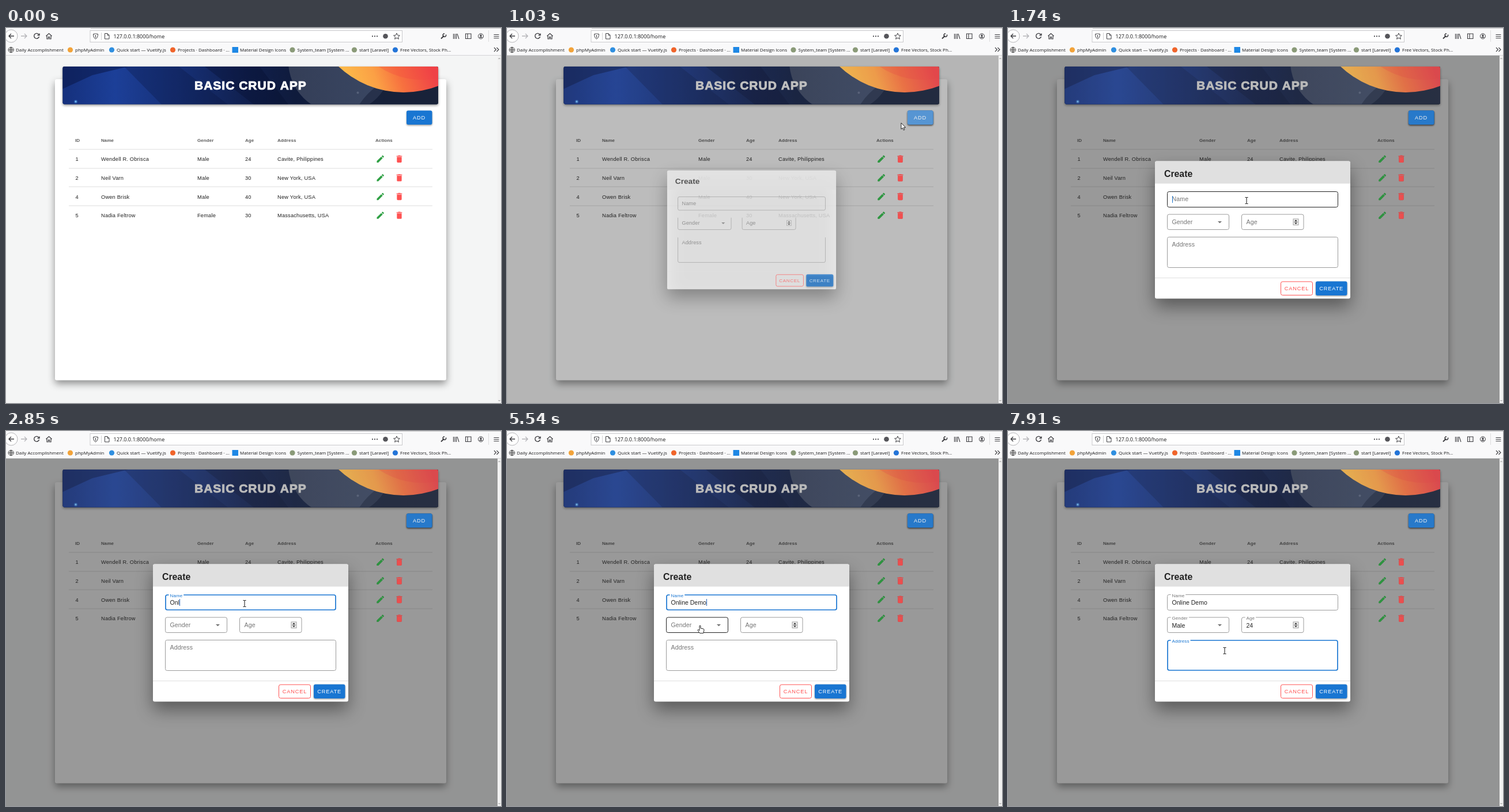
An HTML page with a canvas that plays this animation: 859 by 652 pixels, repeating every 8 s.

```html
<!DOCTYPE html>
<html lang="en">
<head>
<meta charset="utf-8">
<title>Basic CRUD App</title>
<style>
  html, body { margin: 0; width: 100%; height: 100%; overflow: hidden; background: #f4f5f5; }
  canvas { display: block; width: 859px; height: 652px; }
</style>
</head>
<body>
<canvas id="stage" width="859" height="652"></canvas>
<script>
const ctx = document.getElementById('stage').getContext('2d');
const LOOP = 8000, STEP = 79;
const SANS = '"Liberation Sans", Arial, sans-serif';
const UI = '"Open Sans", "Noto Sans", sans-serif';
const BLUE = '#1976d2', RED = '#ff5252', INK = '#212121', GREY = '#757575';

const clamp = v => Math.max(0, Math.min(1, v));
const ramp = (t, a, b) => clamp((t - a) / (b - a));
const easeOut = (v, n) => 1 - Math.pow(1 - v, n);
const mix = (a, b, k) => a + (b - a) * k;

function text(s, x, y, size, color, { weight = 400, font = SANS, gap = 0 } = {}) {
  ctx.font = `${weight} ${size}px ${font}`;
  ctx.letterSpacing = gap + 'px';
  ctx.fillStyle = color;
  ctx.fillText(s, x, y);
  return ctx.measureText(s).width;
}
function rect(x, y, w, h, color) {
  ctx.fillStyle = color;
  ctx.fillRect(x, y, w, h);
}
function roundPath(x, y, w, h, r) {
  ctx.beginPath();
  ctx.roundRect(x, y, w, h, r);
}
function panel(x, y, w, h, color, blur = 0, drop = 0, shade = 0) {
  ctx.save();
  ctx.shadowColor = `rgba(0,0,0,${shade})`;
  ctx.shadowBlur = blur;
  ctx.shadowOffsetY = drop;
  roundPath(x, y, w, h, 3);
  ctx.fillStyle = color;
  ctx.fill();
  ctx.restore();
}
function disc(x, y, r, color) {
  ctx.beginPath();
  ctx.arc(x, y, r, 0, 7);
  ctx.fillStyle = color;
  ctx.fill();
}
function poly(points, color) {
  ctx.beginPath();
  points.forEach(p => ctx.lineTo(...p));
  ctx.fillStyle = color;
  ctx.fill();
}
function stroke(d, color, width = 1.2) {
  ctx.strokeStyle = color;
  ctx.lineWidth = width;
  ctx.stroke(new Path2D(d));
}
function icon(path, cx, cy, scale, color) {
  ctx.save();
  ctx.translate(cx - 12 * scale, cy - 12 * scale);
  ctx.scale(scale, scale);
  ctx.fillStyle = color;
  ctx.fill(path);
  ctx.restore();
}

const PENCIL = new Path2D('M20.7 7C21.1 6.6 21.1 6 20.7 5.6L18.4 3.3C18 2.9 17.4 2.9 17 3.3L15.1 5.1L18.9 8.9ZM3 17.3V21H6.8L17.8 9.9L14.1 6.2Z');
const TRASH = new Path2D('M19 4H15.5L14.5 3H9.5L8.5 4H5V6H19ZM6 19A2 2 0 0 0 8 21H16A2 2 0 0 0 18 19V7H6Z');

// Browser chrome

const BOOKMARKS = [
  [17, 'Daily Accomplishment'],
  [120, 'phpMyAdmin', '#f2a33a'],
  [192, 'Quick start — Vuetify.js', '#2f8fe0'],
  [298, 'Projects · Dashboard · ...', '#f0642b'],
  [406, 'Material Design Icons', '#1e88e5', true],
  [505.5, 'System_team [System ...', '#8a9a78'],
  [613, 'start [Laravel]', '#8a9a78'],
  [684, 'Free Vectors, Stock Ph...', '#2374d8']
];

function drawChrome() {
  const dark = '#3c3c40';
  rect(0, 0, 859, 47, '#f9f9fa');
  rect(147, 0, 712, 1, '#c8c8ca');
  rect(0, 47, 859, 1, '#d4d4d6');

  disc(9, 14, 11, '#fff');
  stroke('M-2 14a11 11 0 1 0 22 0a11 11 0 1 0 -22 0', '#b5b5b8', 1);
  stroke('M14 14H5M9 10L5 14L9 18', dark, 1.4);
  stroke('M26 14H36M32 10L36 14L32 18', '#b4b4b8', 1.3);
  stroke('M57 11.5A4.5 4.5 0 1 0 57.5 15M58 9.5V12.5H54.5', dark, 1.4);
  stroke('M69.5 14L74.5 9.5L79.5 14M71 13.5V19H73.5V15.5H75.5V19H78V13.5', dark);

  rect(145.5, 4, 542.5, 21, '#c9c9cc');
  rect(146.5, 5, 540.5, 19, '#fff');
  stroke('M151.5 10.5Q155 10.5 155.5 9.5Q156 10.5 159.5 10.5Q159.5 17 155.5 19Q151.5 17 151.5 10.5ZM155.5 12V17', dark, 1);
  rect(165, 8, 1, 13, '#d0d0d3');
  stroke('M171.5 9.5H176L179 12.5V19H171.5ZM176 9.5V12.5H179', dark, 1);
  text('127.0.0.1:8000/home', 186.5, 17.8, 9, '#18181a', { font: UI });

  for (const x of [636, 640, 644]) disc(x, 14.3, 1.1, dark);
  disc(658.5, 14.3, 4.3, '#55555a');
  stroke('M678 9L679.6 12.6L683.4 13L680.5 15.5L681.4 19.3L678 17.3L674.6 19.3L675.5 15.5L672.6 13L676.4 12.6Z', dark, 1);
  stroke('M755 18.5L760 13.5', dark, 2);
  stroke('M763.5 11.5A2.8 2.8 0 1 1 761 9.7', dark, 1.5);
  stroke('M776.5 10V19M779 10V19M781.5 10V19M783 10L786 19', dark, 1.1);
  stroke('M797.5 10H807V18.5H797.5ZM801 10V18.5', dark, 1.1);
  stroke('M819.5 14.3a4.5 4.5 0 1 0 9 0a4.5 4.5 0 1 0 -9 0', dark, 1);
  disc(824, 13, 1.7, dark);
  poly([[821, 17], [822.5, 15.3], [825.5, 15.3], [827, 17]], dark);
  rect(837, 4, 1, 20, '#dcdcde');
  stroke('M846.5 11.5H855.5M846.5 14.5H855.5M846.5 17.5H855.5', dark, 1);
  stroke('M847 34L850.5 37.5L847 41M851.5 34L855 37.5L851.5 41', dark, 1.1);

  stroke('M4 38a4.7 4.7 0 1 0 9.4 0a4.7 4.7 0 1 0 -9.4 0M4 38H13.4M8.7 33.3V42.7M8.7 33.3Q4.5 38 8.7 42.7Q13 38 8.7 33.3', '#444', 0.9);
  for (const [x, label, color, square] of BOOKMARKS) {
    if (square) rect(x - 13.5, 33, 10.5, 10, color);
    else if (color) disc(x - 8.5, 38, 4.6, color);
    text(label, x, 40.8, 8, '#18181a', { font: UI });
  }
  rect(853, 48, 6, 604, '#f1f1f1');
  stroke('M854.5 54L856 52.5L857.5 54M854.5 647L856 648.5L857.5 647', '#777', 0.9);
}

// Page

const COLUMNS = [[120, 'ID'], [165, 'Name'], [332, 'Gender'], [415, 'Age'], [471, 'Address'], [641, 'Actions']];
const PEOPLE = [
  ['1', 'Wendell R. Obrisca', 'Male', '24', 'Cavite, Philippines'],
  ['2', 'Neil Varn', 'Male', '30', 'New York, USA'],
  ['4', 'Owen Brisk', 'Male', '40', 'New York, USA'],
  ['5', 'Nadia Feltrow', 'Female', '30', 'Massachusetts, USA']
];
const rowTop = i => 211 + i * 32.65;

function drawBanner(titleColor) {
  ctx.save();
  roundPath(98.5, 67, 651.5, 65.5, 3);
  ctx.clip();
  let g = ctx.createLinearGradient(98, 0, 750, 0);
  [[0, '#15307c'], [0.14, '#1c3f98'], [0.32, '#162f74'], [0.5, '#101f4c'], [0.62, '#0f1b3c'], [1, '#1a2439']]
    .forEach(([at, c]) => g.addColorStop(at, c));
  rect(98, 67, 653, 66, g);
  poly([[98, 67], [212, 67], [150, 82], [98, 106]], 'rgba(8,20,66,.5)');
  poly([[205, 67], [300, 67], [385, 133], [270, 133]], 'rgba(8,18,60,.28)');
  poly([[345, 67], [440, 67], [490, 133], [430, 133]], 'rgba(6,12,40,.3)');
  g = ctx.createLinearGradient(490, 0, 660, 0);
  g.addColorStop(0, '#343e57');
  g.addColorStop(1, '#3a4763');
  disc(580, 58, 90, g);
  disc(705, 190, 108, 'rgba(24,34,58,.55)');
  g = ctx.createLinearGradient(600, 108, 735, 58);
  [[0, '#fcb94a'], [0.32, '#fba045'], [0.6, '#f7703f'], [1, '#ef4248']]
    .forEach(([at, c]) => g.addColorStop(at, c));
  disc(690, -52, 164, g);
  disc(722, -45, 135, 'rgba(240,60,66,.25)');
  disc(121, 128, 3, 'rgba(70,150,230,.45)');
  disc(121, 128, 1.4, '#7cc0f5');
  disc(610.5, 112.5, 2, '#56617a');
  text('BASIC CRUD APP', 327, 107, 21, titleColor, { weight: 700, gap: 1 });
  ctx.strokeStyle = titleColor;
  ctx.lineWidth = 0.9;
  ctx.strokeText('BASIC CRUD APP', 327, 107);
  ctx.restore();
}
function drawActions() {
  PEOPLE.forEach((_, i) => {
    const y = rowTop(i) + 16.7;
    icon(PENCIL, 649.7, y, 0.69, '#2fa044');
    icon(TRASH, 682.5, y, 0.69, RED);
  });
}
function drawAdd(t) {
  panel(695, 143.5, 44.5, 24.5, BLUE, 3, 1.5, 0.4);
  if (t > 860 && t < 1400) panel(695, 143.5, 44.5, 24.5, 'rgba(255,255,255,.1)');
  if (t > 890 && t < 1000) {
    ctx.save();
    roundPath(695, 143.5, 44.5, 24.5, 3);
    ctx.clip();
    disc(721, 156, (t - 890) * 0.275, 'rgba(255,255,255,.24)');
    ctx.restore();
  }
  text('ADD', 706, 159.3, 9.25, '#fff', { gap: 0.83 });
}
function drawPage(t, cursor) {
  rect(0, 48, 853, 604, '#f4f5f5');
  panel(85, 89, 679, 523.5, '#fff', 13, 6, 0.42);
  panel(98.5, 67, 651.5, 65.5, '#101f4c', 4, 2, 0.45);
  drawBanner('#fff');
  drawAdd(t);
  for (const [x, label] of COLUMNS) text(label, x, 198, 8, '#5c5c5c', { weight: 700, gap: 0.08 });
  PEOPLE.forEach((person, i) => {
    const y = rowTop(i);
    const over = t < 960 && cursor && cursor.x < 740 && cursor.y >= y && cursor.y < y + 32.6;
    if (over) rect(109, y, 631, 32.6, '#eee');
    rect(109, Math.round(y) - 0.5, 631, 1, '#dedede');
    person.forEach((cell, c) => text(cell, COLUMNS[c][0] + (c ? 0 : 0.5), y + 20.2, 9.25, INK, { gap: 0.2 }));
  });
  drawActions();
}

// Saturated parts keep most of their colour behind the scrim.
function drawScrim(t, k) {
  rect(0, 48, 853, 604, `rgba(33,33,33,${0.46 * k})`);
  drawBanner('#c9c9c9');
  panel(98.5, 67, 651.5, 65.5, `rgba(115,115,115,${0.17 * k})`);
  drawAdd(t);
  panel(695, 143.5, 44.5, 24.5, t < 1300 ? 'rgba(200,200,200,.25)' : 'rgba(140,140,140,.12)');
  ctx.globalAlpha = 0.8;
  drawActions();
  ctx.globalAlpha = 1;
}

// Dialog

function field(o) {
  const { x, y, w, h, label, value = '', float = 0, focus, hover, caret, open } = o;
  ctx.save();
  if (open) {
    ctx.beginPath();
    ctx.rect(x - 2, y + 2.5, w + 4, h);
    ctx.clip();
  }
  const inset = focus ? 0.5 : 0;
  roundPath(x + inset, y + inset, w - 2 * inset, h - 2 * inset, 3);
  ctx.strokeStyle = focus ? BLUE : hover ? '#222' : '#9b9b9b';
  ctx.lineWidth = focus ? 1.7 : 1;
  ctx.stroke();
  const size = mix(10.6, 8, float);
  ctx.font = `${size}px ${SANS}`;
  ctx.letterSpacing = '0.1px';
  if (float) rect(x + 6, y - 1, (ctx.measureText(label).width + 4) * float, 3, '#fff');
  if (float || !value) text(label, x + 8, y + mix(16.8, 4, float), size, focus && float ? BLUE : GREY, { gap: 0.1 });
  let end = x + 8;
  if (value) end += text(value, x + 8, y + 17.5, 10.5, INK);
  if (caret) rect(Math.round(end), y + 7.5, 1, 12, focus ? '#2463b8' : BLUE);
  ctx.restore();
}

const TYPED = 'Online Demo';
const KEYS = [2440, 2760, 2840, 3000, 3150, 3310, 3390, 3710, 4180, 4290, 4390];
const typedAt = t => KEYS.filter(k => k <= t).length;
const blink = (t, from) => t >= from && (t - from) % 1000 < 500;

const CLICK = { name: 1730, gender: 5560, male: 6400, age: 6960, address: 7400 };

function drawForm(t, opening) {
  const count = typedAt(t);
  const inName = t >= CLICK.name && t < CLICK.gender;
  const inAge = t >= CLICK.age && t < CLICK.address;
  const inAddress = t >= CLICK.address;
  const picked = t > 6540;

  field({
    x: 276.5, y: 284.5, w: 296, h: 27, label: 'Name', value: TYPED.slice(0, count),
    float: easeOut(ramp(t, 1740, 1970), 2), focus: inName && t > 1760, hover: t > 1550 && t < 1800,
    caret: inName && blink(t, count ? KEYS[count - 1] : CLICK.name)
  });
  field({
    x: 276.5, y: 324, w: 107, h: 26.5, label: 'Gender', value: picked ? 'Male' : '',
    float: easeOut(ramp(t, CLICK.gender, 5760), 2), focus: picked && t < CLICK.age,
    hover: t > 5400 && t < 5650, open: opening
  });
  poly([[364, 336], [371, 336], [367.5, 339.5]], GREY);
  field({
    x: 405.5, y: 324, w: 107.5, h: 26.5, label: 'Age', value: t < 7100 ? '' : t < 7210 ? '2' : '24',
    float: easeOut(ramp(t, CLICK.age, 7140), 2), focus: inAge, caret: inAge, open: opening
  });
  rect(494.5, 331.5, 10, 11.5, '#a2a2a2');
  rect(495.5, 332.5, 8, 9.5, '#eee');
  rect(495.5, 337, 8, 0.7, '#aaa');
  poly([[497, 336.3], [502, 336.3], [499.5, 333.6]], '#222');
  poly([[497, 338.4], [502, 338.4], [499.5, 341.1]], '#222');
  field({
    x: 276.5, y: 363.5, w: 296, h: 53, label: 'Address',
    float: easeOut(ramp(t, 7440, 7670), 2), focus: inAddress,
    caret: inAddress && blink(t, CLICK.address), open: opening
  });
}

function drawMenu(t) {
  const shown = easeOut(ramp(t, CLICK.gender, 5780), 3) * (1 - ramp(t, 6560, 6800));
  if (!shown) return;
  const grow = t < 6000 ? mix(0.4, 1, shown) : 1;
  ctx.save();
  ctx.globalAlpha = shown;
  ctx.translate(276.5, 323.5);
  ctx.scale(grow, grow);
  ctx.translate(-276.5, -323.5);
  panel(276.5, 323.5, 108, 65.5, '#fff', 6, 2.5, 0.45);
  if (t > 5950) rect(276.5, 329, 108, 27, '#f5f5f5');
  if (t > CLICK.male) {
    ctx.save();
    ctx.beginPath();
    ctx.rect(276.5, 329, 108, 27);
    ctx.clip();
    disc(324.5, 342.5, mix(0, 62, easeOut(ramp(t, CLICK.male, 6640), 2.4)), '#c0c0c0');
    ctx.restore();
  }
  text('Male', 287, 346, 8.6, INK, { gap: 0.05 });
  text('Female', 287, 373, 8.6, INK, { gap: 0.05 });
  ctx.restore();
}

function drawDialog(t, k) {
  const scale = mix(0.5, 1, k);
  ctx.save();
  ctx.globalAlpha = k;
  ctx.translate(424.5, 350.8);
  ctx.scale(scale, scale);
  ctx.translate(-424.5, -350.8);
  panel(255, 231.5, 339, 239, '#fff', 30, 14, 0.42);
  roundPath(255, 231.5, 339, 39, [3, 3, 0, 0]);
  ctx.fillStyle = '#e0e0e0';
  ctx.fill();
  text('Create', 271, 259, 15.8, INK, { weight: 700 });
  drawForm(t, k < 0.9);
  rect(255, 434, 339, 1, '#e0e0e0');
  roundPath(473.5, 441, 55, 23.5, 3);
  ctx.strokeStyle = RED;
  ctx.lineWidth = 1;
  ctx.stroke();
  text('CANCEL', 479.7, 456.3, 9.25, RED, { gap: 0.83 });
  panel(534, 440.5, 54.5, 24.5, BLUE, 3, 1.3, 0.4);
  text('CREATE', 540.3, 456.3, 9.25, '#fff', { gap: 0.83 });
  drawMenu(t);
  ctx.restore();
}

// Pointer: time, x, y

const TRACK = [
  [140, 784, 562], [500, 738, 375], [870, 724, 155], [948, 724, 155], [1027, 684, 165],
  [1560, 414, 300], [5040, 414, 300], [5480, 335, 338], [5850, 335, 338], [6250, 320, 344],
  [6680, 320, 344], [6930, 445, 339], [7120, 445, 339], [7390, 376, 382]
];
const SHAPES = [[140, 'arrow'], [1500, 'beam'], [5300, 'hand'], [6840, 'beam']];

function cursorAt(t) {
  if (t < TRACK[0][0]) return null;
  const i = TRACK.findLastIndex(k => k[0] <= t);
  const a = TRACK[i], b = TRACK[i + 1] || a;
  const k = a === b ? 0 : ramp(t, a[0], b[0]);
  const shape = SHAPES.findLast(s => s[0] <= t)[1];
  return { x: mix(a[1], b[1], k), y: mix(a[2], b[2], k), shape };
}
function drawCursor({ x, y, shape }) {
  ctx.save();
  ctx.translate(x, y);
  if (shape === 'beam') {
    stroke('M-2.5 -5.5H-0.7L0 -5L0.7 -5.5H2.5M0 -5V5M-2.5 5.5H-0.7L0 5L0.7 5.5H2.5', '#111', 1);
  } else {
    const path = new Path2D(shape === 'arrow'
      ? 'M0 0V11L2.5 8.6L4.3 12.6L6 11.8L4.3 8H7.7Z'
      : 'M-1 1Q0 -1 1 1V5L6 6Q7 6.5 7 8L5.8 13.5H-0.5L-4 8.5Q-4 6.8 -2.5 7.5L-1 9Z');
    ctx.fillStyle = '#fff';
    ctx.fill(path);
    ctx.strokeStyle = '#111';
    ctx.lineWidth = 0.9;
    ctx.stroke(path);
  }
  ctx.restore();
}

function draw(now) {
  const t = Math.floor((now % LOOP + 10) / STEP) * STEP;
  const cursor = cursorAt(t);
  const opened = ramp(t, 958, 1258);
  drawPage(t, cursor);
  if (opened) {
    drawScrim(t, easeOut(opened, 4));
    drawDialog(t, easeOut(opened, 5));
  }
  drawChrome();
  if (cursor) drawCursor(cursor);
}

const start = performance.now();
function tick() {
  draw(performance.now() - start);
  requestAnimationFrame(tick);
}
tick();
</script>
</body>
</html>
```
